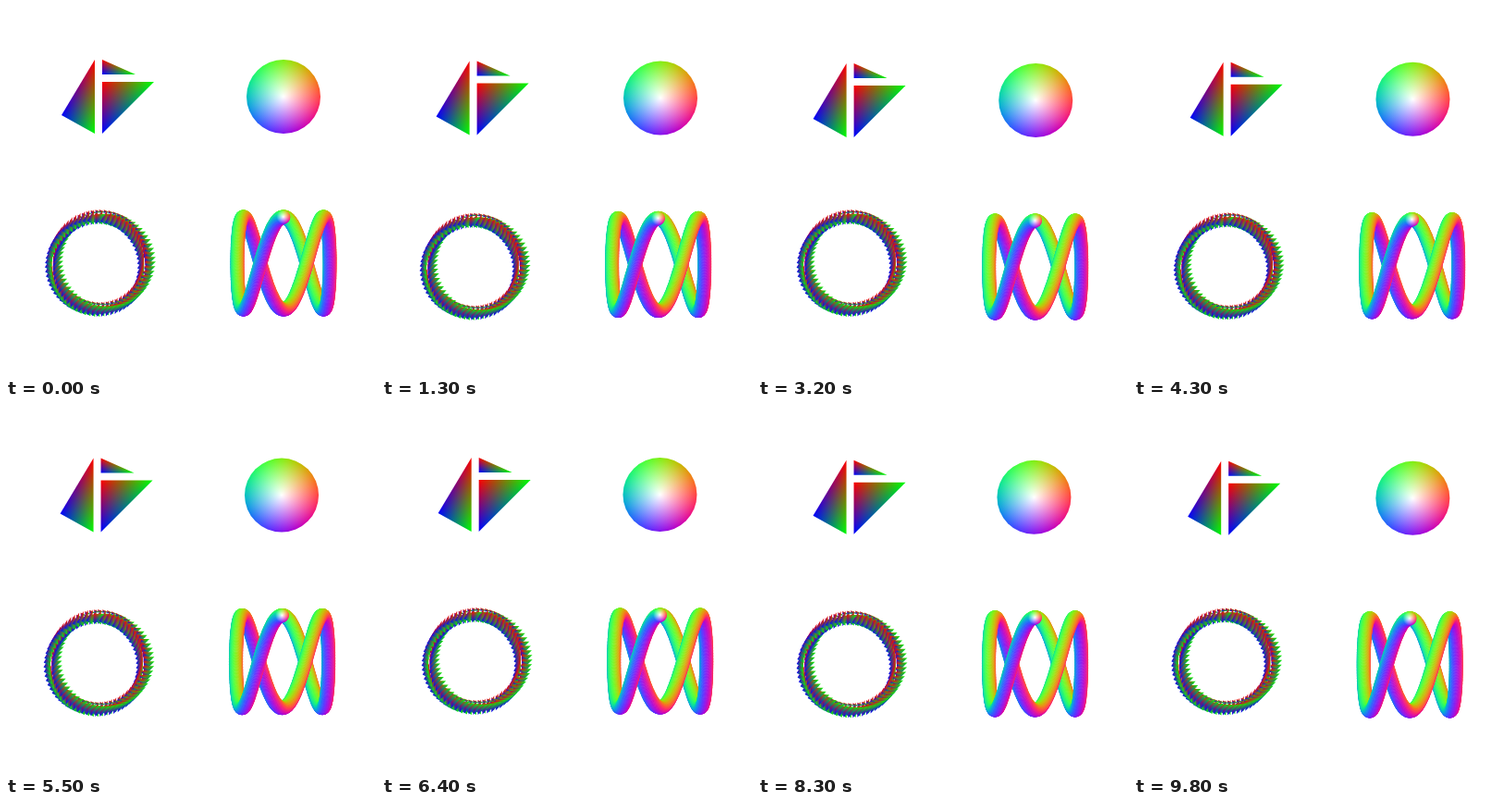
An HTML page with a canvas that plays this animation: 400 by 400 pixels, repeating every 9900 ms.

```html
<!DOCTYPE html>
<html>
<head>
<meta charset="utf-8">
<style>
html, body { margin: 0; width: 100%; height: 100%; overflow: hidden; background: #fff; }
canvas { display: block; width: 400px; height: 400px; }
</style>
</head>
<body>
<canvas id="stage" width="400" height="400"></canvas>
<script>
const ctx = document.getElementById('stage').getContext('2d');
const TAU = Math.PI * 2;
const LOOP = 9900, STEP = 100;
const { sin, cos } = Math;

// Corners in the order red, green, blue
const triangles = [
  [[-4, -40], [-4, 40], [-40, 20]],
  [[4, -40], [40, -24], [4, -24]],
  [[4, -16], [60, -16], [4, 40]]
].map(pts => ({ pts, fills: ['#f00', '#0f0', '#00f'].map((color, i) => cornerFill(pts, i, color)) }));

// Fades from one corner to black on the opposite edge
function cornerFill(pts, i, color) {
  const [ax, ay] = pts[i], [bx, by] = pts[(i + 1) % 3], [cx, cy] = pts[(i + 2) % 3];
  const ex = cx - bx, ey = cy - by;
  const k = ((ax - bx) * ex + (ay - by) * ey) / (ex * ex + ey * ey);
  const g = ctx.createLinearGradient(ax, ay, bx + k * ex, by + k * ey);
  g.addColorStop(0, color);
  g.addColorStop(1, '#000');
  return g;
}

// Each channel is a raised cosine, a third of a turn apart
function rainbow(a) {
  const [r, g, b] = [0, 1, 2].map(i => 127.5 * (1 + cos(a - i * TAU / 3)));
  return `rgb(${r}, ${g}, ${b})`;
}

const wheel = ctx.createConicGradient(0, 0, 0);
for (let i = 0; i <= 36; i++) wheel.addColorStop(i / 36, rainbow(-i / 36 * TAU));
const glow = ctx.createRadialGradient(0, 0, 0, 0, 0, 40);
glow.addColorStop(0, 'rgba(255,255,255,1)');
glow.addColorStop(1, 'rgba(255,255,255,0)');

function place(x, y, scale) {
  ctx.setTransform(scale, 0, 0, scale, x, y);
}

function shards(x, y, scale) {
  place(x, y, scale);
  for (const { pts, fills } of triangles) {
    ctx.beginPath();
    for (const p of pts) ctx.lineTo(p[0], p[1]);
    ctx.closePath();
    ctx.globalCompositeOperation = 'source-over';
    ctx.fillStyle = '#000';
    ctx.fill();
    ctx.globalCompositeOperation = 'lighter';
    for (const f of fills) {
      ctx.fillStyle = f;
      ctx.fill();
    }
  }
  ctx.globalCompositeOperation = 'source-over';
}

function disc(x, y, scale) {
  place(x, y, scale);
  ctx.beginPath();
  ctx.arc(0, 0, 40, 0, TAU);
  ctx.fillStyle = wheel;
  ctx.fill();
  ctx.fillStyle = glow;
  ctx.fill();
}

// Stamps a shape along x = sin a, y = -cos(n a)
function trail(shape, scale, step, n, x, y) {
  for (let i = 0; i * step < TAU; i++) {
    const a = i * step;
    shape(x + 50 * sin(a), y - 50 * cos(n * a), scale);
  }
}

function draw(ms) {
  const t = Math.floor((ms % LOOP) / STEP) * STEP / 1000;
  const dx = 2 * sin(3 * t), dy = -2 * cos(t);
  place(0, 0, 1);
  ctx.fillStyle = '#fff';
  ctx.fillRect(0, 0, 400, 400);
  shards(100 + dx, 100 + dy, 1);
  disc(300 + 2 * sin(2 * t), 100 + dy, 1);
  trail(shards, 0.2, 0.1, 1, 100 + dx, 280 - 2 * cos(2 * t));
  // Slightly small, as overlapping soft edges thicken the tube
  trail(disc, 0.19, 0.01, 3, 300 + dx, 280 + dy);
}

const start = performance.now();
function tick() {
  draw(performance.now() - start);
  requestAnimationFrame(tick);
}
tick();
</script>
</body>
</html>
```
